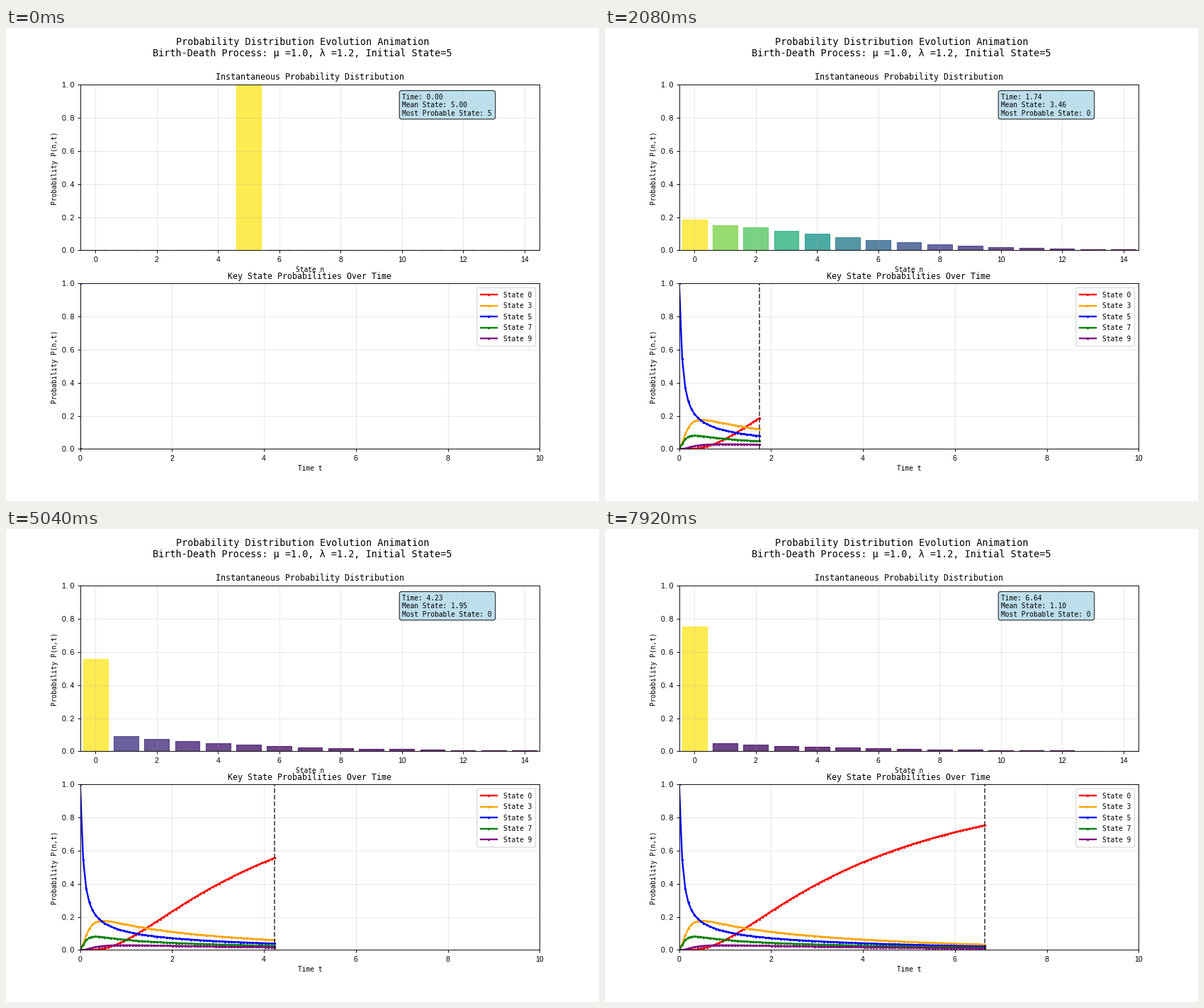
Write a matplotlib script that moves like this. It is 837 by 669 pixels and loops after 8000 ms.

```python
import numpy as np
import matplotlib.pyplot as plt
from matplotlib.animation import FuncAnimation
from matplotlib.lines import Line2D
from matplotlib.patches import FancyBboxPatch
from matplotlib.transforms import IdentityTransform

W, H, DPI = 837, 669, 96
PT = 0.8715              # one layout point in figure points
PX = 72 / DPI            # one pixel in figure points
HALF_EM = PT / 1.2       # sizes the monospaced font to half-em cells

STATES, START = 15, 5
BIRTH, DEATH = 1.0, 1.2
FRAMES, INTERVAL = 100, 80
TIMES = np.linspace(0, 10, 150)
TRACKED = {0: "red", 3: "orange", 5: "blue", 7: "green", 9: "purple"}

plt.rcParams.update({
    "font.family": "Liberation Sans", "font.size": 9 * PT,
    "axes.linewidth": 0.8 * PT,
    "grid.linewidth": 0.8 * PT, "grid.alpha": 0.3,
    "xtick.major.size": 3.5 * PT, "ytick.major.size": 3.5 * PT,
    "xtick.major.pad": 3.5 * PT, "ytick.major.pad": 3.5 * PT,
    "xtick.major.width": 0.8 * PT, "ytick.major.width": 0.8 * PT,
    "lines.markeredgewidth": PT, "patch.linewidth": PT,
})


def solve():
    """State probabilities at every time, with no births in the top state."""
    n = np.arange(STATES)
    up = BIRTH * n * (n < STATES - 1)
    down = DEATH * n
    rates = np.diag(up[:-1], -1) + np.diag(down[1:], 1) - np.diag(up + down)
    step = term = np.eye(STATES)
    for k in range(1, 40):
        term = term @ rates * (TIMES[1] / k)
        step = step + term
    rows = [np.eye(STATES)[START]]
    while len(rows) < len(TIMES):
        rows.append(step @ rows[-1])
    return np.array(rows)


prob = solve()

fig, (top, bottom) = plt.subplots(2, 1, figsize=(W / DPI, H / DPI), dpi=DPI)


def write(x, y, text, size=10, **kw):
    """Text at a pixel position measured from the top left corner."""
    return fig.text(x / W, 1 - y / H, text, family="DejaVu Sans Mono",
                    size=size * HALF_EM, va="baseline", **kw)


def rounded_box(left, upper, right, lower, radius, **kw):
    fig.add_artist(FancyBboxPatch(
        (left, H - lower), right - left, lower - upper,
        boxstyle=f"round,pad=0,rounding_size={radius}",
        transform=IdentityTransform(), **kw))


def spaced(value, _):
    return f"{value:.1f}".replace(".", ". ")


for ax in (top, bottom):
    ax.set_ylim(0, 1)
    ax.yaxis.set_major_formatter(spaced)
    ax.grid(True)
top.set_xlim(-0.5, STATES - 0.5)
top.set_xticks(range(0, STATES, 2))
bottom.set_xlim(0, 10)

write(418.5, 24, "Probability Distribution Evolution Animation", 14, ha="center")
write(418.5, 40, "Birth-Death Process: μ =1.0, λ =1.2, Initial State=5", 14, ha="center")
write(429.5, 73.3, "Instantaneous Probability Distribution", 12, ha="center")
write(429, 345.3, "State n", ha="center")
write(429, 354.5, "Key State Probabilities Over Time", 12, ha="center")
write(429, 626.3, "Time t", ha="center")
for y in (198.5, 479.5):
    write(72, y, "Probability P(n,t)", ha="center", rotation=90,
          rotation_mode="anchor")

bars = top.bar(range(STATES), prob[0], width=0.8, alpha=0.8)
rounded_box(555.2, 88.5, 690.7, 128.9, 3.5,
            facecolor="lightblue", edgecolor="black", alpha=0.8)
info = [write(558.7, y, "") for y in (101, 112.5, 124)]

rounded_box(664.9, 367.4, 747.5, 450, 2.3,
            facecolor="white", edgecolor="0.8", alpha=0.8)
style = dict(lw=2 * PT, marker="o", ms=2 * PT)
curves = {}
for row, (state, color) in enumerate(TRACKED.items()):
    curves[state], = bottom.plot([], [], color=color, **style)
    y = 377 + 15.55 * row
    fig.add_artist(Line2D([669.5, 681.1, 692.7], [H - y] * 3, color=color,
                          markevery=[1], transform=IdentityTransform(),
                          zorder=2, **style))
    write(702, y + 3.7, f"State {state}")
cursor, = bottom.plot([], [], "k--", lw=1.5 * PT, alpha=0.7)


def update(frame):
    p, t = prob[frame], TIMES[frame]
    for bar, height, color in zip(bars, p, plt.cm.viridis(p / p.max())):
        bar.set_height(height)
        bar.set_color(color)
    for state, curve in curves.items():
        curve.set_data(TIMES[:frame + 1], prob[:frame + 1, state])
    cursor.set_data([t, t], [0, 1])
    info[0].set_text(f"Time: {t:.2f}")
    info[1].set_text(f"Mean State: {p @ np.arange(STATES):.2f}")
    info[2].set_text(f"Most Probable State: {p.argmax()}")
    return []


anim = FuncAnimation(fig, update, frames=FRAMES, interval=INTERVAL,
                     init_func=lambda: update(0), repeat=True, repeat_delay=0)
plt.show()
```
